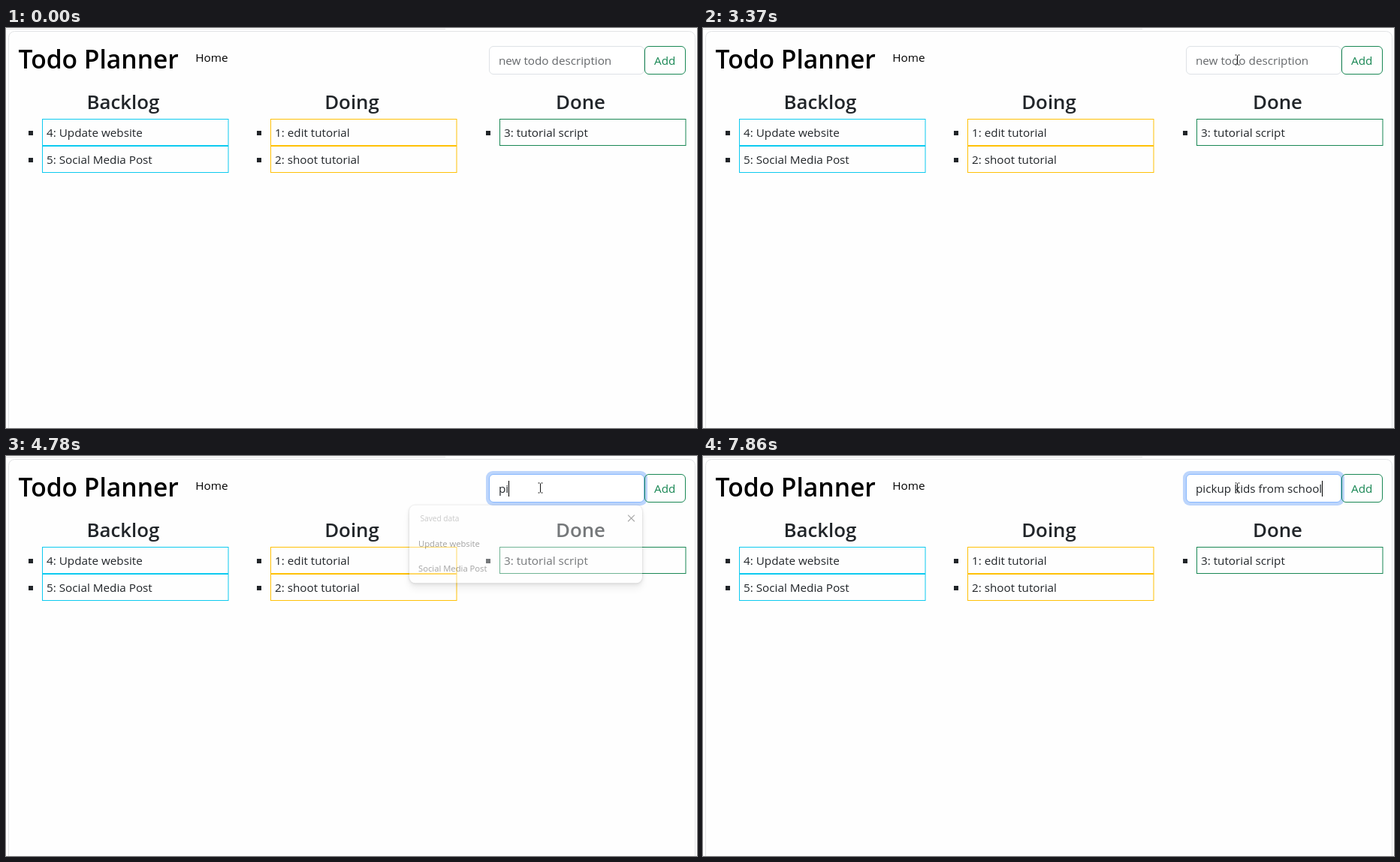
An HTML page for the animation above (8 s loop, 920 by 533 pixels).

```html
<!DOCTYPE html>
<html lang="en">
<head>
<meta charset="utf-8">
<title>Todo Planner</title>
<style>
  html, body { margin: 0; width: 100%; height: 100%; overflow: hidden; background: #fefefe; }
  svg { display: block; }
  text { font: 15.25px "Open Sans", "Noto Sans", sans-serif; fill: #212529; white-space: pre; }
  .title { font-size: 33.6px; font-weight: 600; fill: #000; }
  .head { font-size: 25.8px; font-weight: 600; text-anchor: middle; }
  .hint { fill: #65686b; }
  .add { fill: #198754; }
  .small { font-size: 11.6px; fill: #111; }
  .label { font-size: 10.5px; fill: #757575; }
  .panel {
    fill: #fff;
    filter: drop-shadow(0 0 1px rgba(0,0,0,.35)) drop-shadow(0 2px 2px rgba(0,0,0,.22))
      drop-shadow(0 7px 5px rgba(0,0,0,.16));
  }
</style>
</head>
<body>
<svg width="920" height="533" viewBox="0 0 920 533">
  <path d="M0 1.5H585" stroke="#e6e6e6"/>
  <rect x="3.5" y="4.5" width="914" height="560" rx="8" fill="none" stroke="#e2e4e6"/>
  <text class="title" x="16.5" y="54">Todo Planner</text>
  <text x="252.3" y="45" style="fill:#000">Home</text>
  <g id="board"></g>

  <rect id="ring" x="639" y="20" width="215" height="46" rx="9" fill="#bcd5fc"/>
  <rect id="field" x="643.5" y="24.5" width="206" height="37" rx="5.5" fill="#fff"/>
  <rect x="850.5" y="24.5" width="54" height="37" rx="5.5" fill="none" stroke="#198754"/>
  <text class="add" x="863" y="49">Add</text>
  <text id="hint" class="hint" x="656" y="49">new todo description</text>
  <text id="typed" x="656" y="49"></text>
  <rect id="caret" y="33" width="1" height="21" fill="#000"/>

  <g id="popup">
    <rect class="panel" x="530" y="63" width="320" height="107" rx="8"/>
    <text class="label" x="545" y="85">Saved data</text>
    <path d="M830.5 76.5l9 9m0 -9l-9 9" stroke="#222" stroke-width="1.2"/>
    <text class="small" x="542.5" y="120">Update website</text>
    <text class="small" x="542.5" y="154">Social Media Post</text>
  </g>

  <path id="arrow" d="M.5 .5V16.5L4.2 13L6.8 18.8L9.2 17.7L6.8 12.2H11.8Z" fill="#fff" stroke="#111"/>
  <path id="beam" d="M-3 -6.5H-1M1 -6.5H3M-3 6.5H-1M1 6.5H3M0 -6V6" fill="none" stroke="#111"/>
</svg>
<script>
const LOOP = 8000;
const BEAM_AT = 3240, FOCUS_AT = 3520, CARET_OFF = 3950, TYPE_AT = 4510;

const $ = id => document.getElementById(id);
const [board, ring, field, hint, typed, caret, popup, arrow, beam] =
  ['board', 'ring', 'field', 'hint', 'typed', 'caret', 'popup', 'arrow', 'beam'].map($);

const columns = [
  { name: 'Backlog', mid: 156, x: 48, color: '#0dcaf0', items: ['4: Update website', '5: Social Media Post'] },
  { name: 'Doing', mid: 460.5, x: 352, color: '#ffc107', items: ['1: edit tutorial', '2: shoot tutorial'] },
  { name: 'Done', mid: 765, x: 657, color: '#198754', items: ['3: tutorial script'] }
];
board.innerHTML = columns.map(({ name, mid, x, color, items }) =>
  `<text class="head" x="${mid}" y="108">${name}</text>` +
  items.map((item, i) => {
    const y = 121 + 36 * i;
    return `<rect x="${x - 18}" y="${y + 16}" width="6" height="6" fill="#212529"/>
      <rect x="${x + .5}" y="${y + .5}" width="247.5" height="35" fill="none" stroke="${color}"/>
      <text x="${x + 6}" y="${y + 24}">${item}</text>`;
  }).join('')).join('');

// Two curved sweeps of the pointer: start, bend and end points
const sweeps = [
  { from: 710, to: 1730, step: 125, path: [[574, 488], [460, 330], [511, 293]] },
  { from: 2030, to: 3400, step: 134, path: [[511, 293], [105, 290], [711, 42]] }
];

const bursts = [
  { from: 4510, to: 5050, text: 'pick' },
  { from: 5320, to: 6020, text: 'up kids ' },
  { from: 6300, to: 7310, text: 'from scho' },
  { from: 7610, to: 7860, text: 'ol' }
];

const clamp = v => Math.min(1, Math.max(0, v));
const ramp = (t, from, to) => clamp((t - from) / (to - from));
const easeOut = u => 1 - (1 - u) ** 3;
const snap = (t, from, step) => from + Math.floor((t - from) / step) * step;
const show = (el, on) => el.setAttribute('visibility', on ? 'visible' : 'hidden');

function pointer(t) {
  const { from, to, step, path: [a, b, c] } = sweeps.findLast(s => t >= s.from) || sweeps[0];
  const u = easeOut(ramp(snap(t, from, step), from, to)), v = 1 - u;
  return [0, 1].map(i => Math.round(v * v * a[i] + 2 * u * v * b[i] + u * u * c[i]));
}

const entered = t => bursts.filter(b => t >= b.from).map(({ from, to, text }) =>
  text.slice(0, 1 + Math.floor(ramp(t, from, to) * (text.length - 1)))).join('');

function draw(t) {
  const [x, y] = pointer(t);
  show(arrow, t >= sweeps[0].from && t < BEAM_AT);
  show(beam, t >= BEAM_AT);
  arrow.setAttribute('transform', `translate(${x} ${y})`);
  beam.setAttribute('transform', `translate(${x + .5} ${y + .5})`);

  const focus = t >= FOCUS_AT;
  show(ring, focus);
  field.setAttribute('stroke', focus ? '#86b7fe' : '#dee2e6');

  const text = entered(t);
  if (typed.textContent !== text) typed.textContent = text;
  show(hint, !text);
  show(caret, focus && (t < CARET_OFF || t >= TYPE_AT));
  caret.setAttribute('x', Math.round(656 + (text ? typed.getComputedTextLength() : 0)));

  const alpha = ramp(t, 3440, 3670) - ramp(snap(t, TYPE_AT, 135), TYPE_AT, 4945);
  const scale = .95 + .05 * alpha;
  show(popup, focus && alpha > .1);
  popup.setAttribute('opacity', alpha);
  popup.setAttribute('transform', `translate(754 143) scale(${scale}) translate(-754 -143)`);
}

const start = performance.now();
function tick() {
  draw((performance.now() - start) % LOOP);
  requestAnimationFrame(tick);
}
tick();
</script>
</body>
</html>
```
